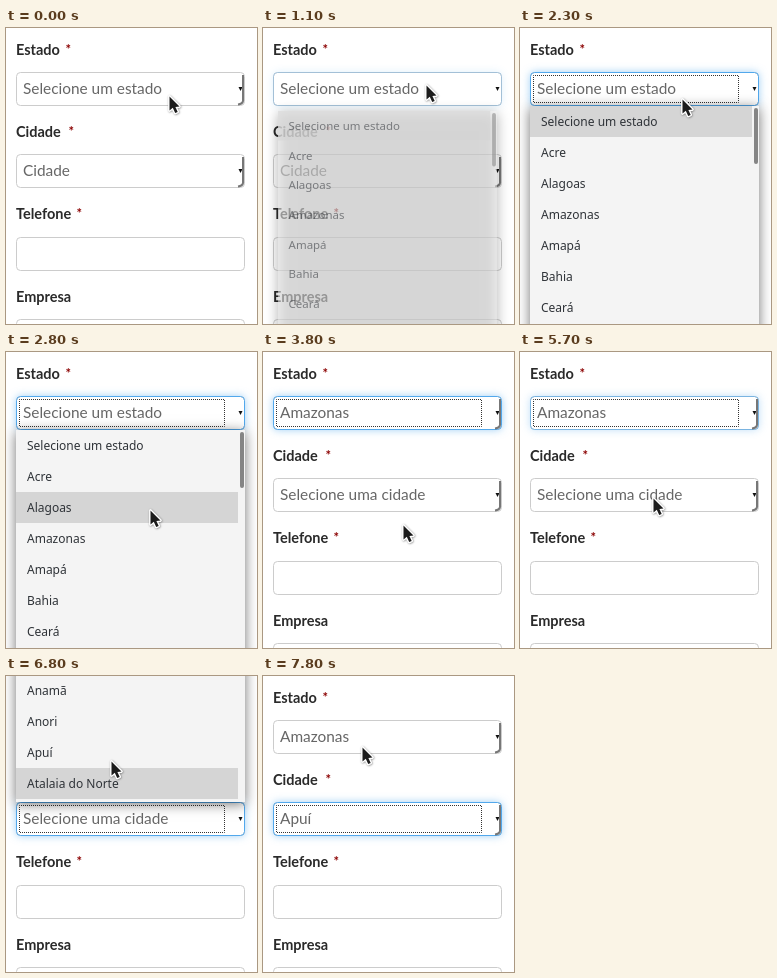
Write an HTML page with a canvas that moves like this. It is 251x296 px and loops after 8000 ms.

```html
<!DOCTYPE html>
<html lang="pt-BR">
<head>
<meta charset="utf-8">
<title>Formulário</title>
<style>
html, body { margin: 0; width: 100%; height: 100%; overflow: hidden; background: #fff; }
canvas { display: block; width: 251px; height: 296px; }
</style>
</head>
<body>
<canvas id="stage" width="251" height="296"></canvas>
<script>
const ctx = document.getElementById('stage').getContext('2d');
const LOOP = 8000, STEP = 100, ROW = 31;
const OPEN_STATE = 1100, PICK_STATE = 3400, OPEN_CITY = 5800, PICK_CITY = 7800;
const STATES = ['Selecione um estado', 'Acre', 'Alagoas', 'Amazonas', 'Amapá', 'Bahia', 'Ceará'];
const CITIES = ['Anamã', 'Anori', 'Apuí', 'Atalaia do Norte'];

const easeOut = p => 1 - (1 - p) ** 2;
const smooth = p => p * p * (3 - 2 * p);

const HOME = { x: 163, y: 68 };
const MOVES = [
  { start: 500, steps: 4, x: 163, y: 57, ease: easeOut },
  { start: 2300, steps: 2, x: 162, y: 75, ease: easeOut },
  { start: 2600, steps: 5, x: 140, y: 174, ease: easeOut },
  { start: 3800, steps: 8, x: 133, y: 146, ease: smooth, bow: 5 },
  { start: 6500, steps: 7, x: 99, y: 71, ease: easeOut }
];

// Progress 0..1 in whole steps; the first step already shows at the start time
function progress(t, start, steps) {
  const step = Math.floor((t - start) / STEP) + 1;
  return Math.max(0, Math.min(1, step / steps));
}

function pointerAt(t) {
  let { x, y } = HOME;
  for (const move of MOVES) {
    const e = move.ease(progress(t, move.start, move.steps));
    x += (move.x - x) * e + (move.bow || 0) * Math.sin(Math.PI * e);
    y += (move.y - y) * e;
  }
  return { x: Math.round(x), y: Math.round(y) };
}

// The highlight trails the pointer by one step
function hoveredRow(t, firstRow) {
  return Math.max(0, Math.floor((pointerAt(t - STEP).y + 4 - firstRow) / ROW));
}

function text(str, x, y, font, color) {
  ctx.font = font;
  ctx.fillStyle = color;
  ctx.fillText(str, x, y);
}

function label(str, y, starX) {
  text(str, 10, y, 'bold 14.5px Lato, sans-serif', '#2a2a2a');
  if (starX) text('*', starX, y - 1, 'bold 13px Lato, sans-serif', '#8b0000');
}

function box(y, focus = 0) {
  ctx.beginPath();
  ctx.roundRect(10.5, y + .5, 228, 33, 4);
  ctx.save();
  ctx.shadowColor = `rgba(82,168,236,${.6 * focus})`;
  ctx.shadowBlur = 8;
  ctx.fillStyle = '#fff';
  ctx.fill();
  ctx.restore();
  ctx.strokeStyle = '#ccc';
  ctx.stroke();
  ctx.strokeStyle = `rgba(82,168,236,${focus})`;
  ctx.stroke();
}

function bevel(y) {
  ctx.save();
  ctx.strokeStyle = '#777';
  ctx.lineWidth = 2;
  ctx.beginPath();
  ctx.moveTo(237, y + 3);
  ctx.lineTo(237, y + 29);
  ctx.quadraticCurveTo(236.5, y + 32, 232, y + 32.5);
  ctx.stroke();
  ctx.restore();
}

function focusRing(y) {
  ctx.save();
  ctx.setLineDash([1, 1]);
  ctx.lineDashOffset = .5;
  ctx.strokeStyle = '#333';
  ctx.strokeRect(13.5, y + 3.5, 205, 27);
  ctx.restore();
}

function select(str, y, focus, open) {
  box(y, focus);
  text(str, 17, y + 22, '15.4px Lato, sans-serif', '#666');
  ctx.fillStyle = '#111';
  ctx.beginPath();
  ctx.moveTo(232.5, y + 15);
  ctx.lineTo(236.5, y + 15);
  ctx.lineTo(234.5, y + 19);
  ctx.fill();
  if (!open) bevel(y);
  if (focus > .5) focusRing(y);
}

// The popup fades in while growing slightly to full size
function popup(rows, top, height, firstRow, hover, alpha, centerY) {
  if (!alpha) return;
  const zoom = .9 + .1 * alpha;
  ctx.save();
  ctx.globalAlpha = alpha;
  ctx.translate(124, centerY);
  ctx.scale(zoom, zoom);
  ctx.translate(-124, -centerY);
  ctx.save();
  ctx.shadowColor = 'rgba(0,0,0,.55)';
  ctx.shadowBlur = 12;
  ctx.shadowOffsetY = 2;
  ctx.fillStyle = '#f4f4f4';
  ctx.fillRect(10, top, 229, height);
  ctx.restore();
  rows.forEach((row, i) => {
    const y = firstRow + i * ROW;
    if (i === hover) {
      ctx.fillStyle = '#d5d5d5';
      ctx.fillRect(10, y, 222, ROW);
    }
    text(row, 21, y + 20, '12px "Noto Sans", sans-serif', '#2f3338');
  });
  // Scroll thumb sits at the top of the list
  ctx.fillStyle = '#858585';
  ctx.beginPath();
  ctx.roundRect(234, top + 2, 4, 56, 2);
  ctx.fill();
  ctx.restore();
}

function pointer({ x, y }) {
  ctx.save();
  ctx.translate(x + .5, y + .5);
  ctx.beginPath();
  ctx.moveTo(0, 0);
  ctx.lineTo(0, 14);
  ctx.lineTo(3.3, 11.3);
  ctx.lineTo(5.7, 16.5);
  ctx.lineTo(8.2, 15.4);
  ctx.lineTo(5.9, 10.4);
  ctx.lineTo(10, 10);
  ctx.closePath();
  ctx.shadowColor = 'rgba(0,0,0,.45)';
  ctx.shadowBlur = 2;
  ctx.shadowOffsetX = ctx.shadowOffsetY = .5;
  ctx.strokeStyle = '#fff';
  ctx.lineWidth = 2.8;
  ctx.lineJoin = 'round';
  ctx.stroke();
  ctx.shadowColor = 'transparent';
  ctx.fillStyle = '#1c1c1c';
  ctx.fill();
  ctx.restore();
}

function draw(t) {
  const stateIn = progress(t, OPEN_STATE, 3), cityIn = progress(t, OPEN_CITY, 3);
  const stateOpen = t < PICK_STATE ? easeOut(stateIn) : 0;
  const cityOpen = t < PICK_CITY ? easeOut(cityIn) : 0;
  const stateFocus = stateIn - progress(t, OPEN_CITY - STEP, 3);
  const state = t < PICK_STATE ? STATES[0] : 'Amazonas';
  const city = t < PICK_STATE ? 'Cidade' : t < PICK_CITY ? 'Selecione uma cidade' : 'Apuí';

  ctx.fillStyle = '#fff';
  ctx.fillRect(0, 0, 251, 296);
  label('Estado', 27, 59.5);
  label('Cidade', 109, 62.5);
  label('Telefone', 191, 70.5);
  label('Empresa', 274);
  select(state, 44, stateFocus, stateOpen);
  select(city, 126, cityIn, cityOpen);
  box(209);
  box(291);

  popup(STATES, 78, 240, 78, hoveredRow(t, 78), stateOpen, 190);
  popup(CITIES, -120, 246, -1, hoveredRow(t, -1), cityOpen, 10);
  pointer(pointerAt(t));
}

function tick() {
  draw(performance.now() % LOOP);
  requestAnimationFrame(tick);
}
tick();
</script>
</body>
</html>
```
